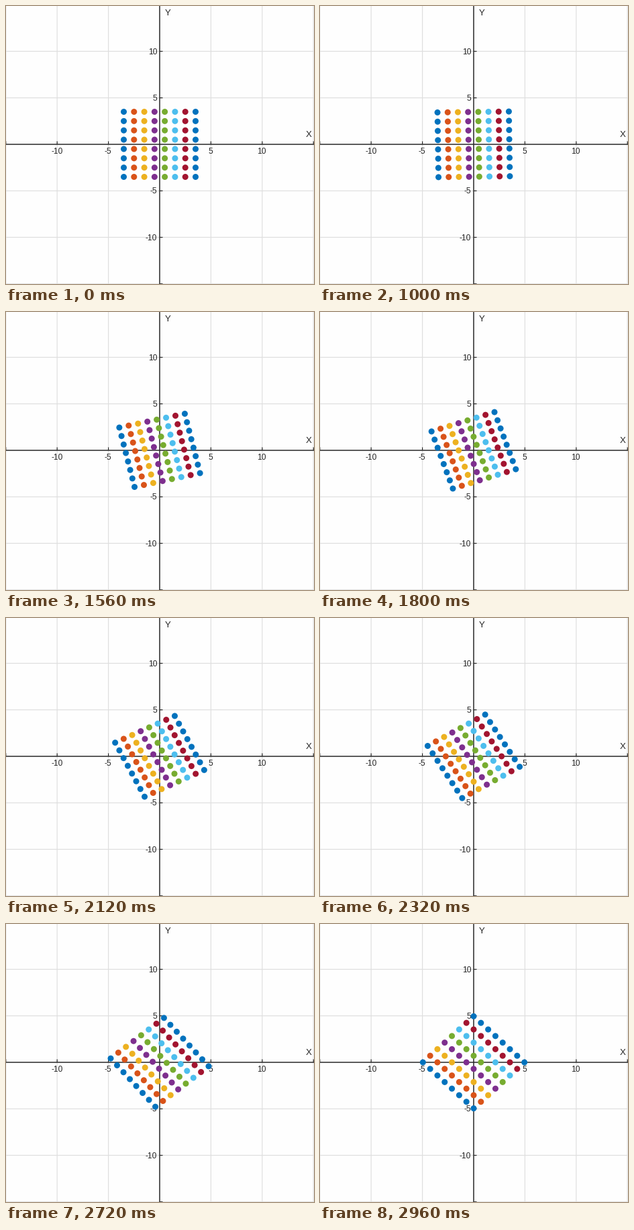
Write a matplotlib script that moves like this. It is 459x414 px and loops after 3 s.

```python
import numpy as np
import matplotlib.pyplot as plt
from matplotlib.animation import FuncAnimation

W, H = 459, 414
DPI = 72                      # one point equals one pixel
X0, Y0 = 229, 206             # plot origin on the stage
SX, SY = 15.28, 13.85         # pixels per unit
FRAMES, HOLD, STEP = 75, 25, 40

COLORS = ["#0072BD", "#D95319", "#EDB120", "#7E2F8E",
          "#77AC30", "#4DBEEE", "#A2142F"]
INK, GRID, PAPER = "#262626", "#dfdfdf", "#fefefe"

plt.rcParams["font.family"] = "Liberation Sans"
fig = plt.figure(figsize=(W / DPI, H / DPI), dpi=DPI, facecolor=PAPER)
ax = fig.add_axes([0, 0, 1, 1])
ax.set_xlim(0, W)
ax.set_ylim(H, 0)
ax.axis("off")


def to_px(x, y):
    return X0 + SX * x, Y0 - SY * y


def line(x, y, color, width, z):
    ax.plot(x, y, color=color, lw=width, zorder=z,
            solid_capstyle="butt", snap=False)


def label(x, y, text, ha, size=12):
    ax.text(x, y, text, ha=ha, va="baseline", fontsize=size, color=INK, zorder=3)


# Grid, ticks and numbers
for v in range(-15, 16, 5):
    if v == 0:
        continue
    gx, gy = to_px(v, v)
    line([gx, gx], [0, H], GRID, 1.2, 1)
    line([0, W], [gy, gy], GRID, 1.2, 1)
    line([gx, gx], [Y0 - 4.5, Y0], INK, 1.2, 2)
    line([X0, X0 + 4.5], [gy, gy], INK, 1.2, 2)
    if abs(v) < 15:
        label(gx - 0.5, 220.4, str(v), "center")
        label(X0 - 3.7, gy + 4.2, str(v), "right")

# Axes
line([0, W], [Y0, Y0], INK, 1.5, 2)
line([X0, X0], [0, H], INK, 1.5, 2)
label(451, 195, "X", "center", 13.2)
label(241.2, 14.3, "Y", "center", 13.2)

# 8 x 8 lattice, one colour per column
side = np.arange(8) - 3.5
start = np.array([(x, y) for x in side for y in side])
c = np.sqrt(0.5)
end = start @ np.array([[c, c], [-c, c]])
dot_colors = [COLORS[i // 8 % 7] for i in range(64)]
dots = ax.scatter(*to_px(*start.T), s=9 ** 2, c=dot_colors,
                  linewidths=0, zorder=4)


def update(i):
    # Each point slides straight to its place turned by 45 degrees
    t = max(0, i - HOLD + 1) / (FRAMES - HOLD)
    pos = (1 - t) * start + t * end
    dots.set_offsets(np.column_stack(to_px(*pos.T)))
    return dots,


anim = FuncAnimation(fig, update, frames=FRAMES, interval=STEP,
                     repeat=True, repeat_delay=0, blit=False)
plt.show()
```
